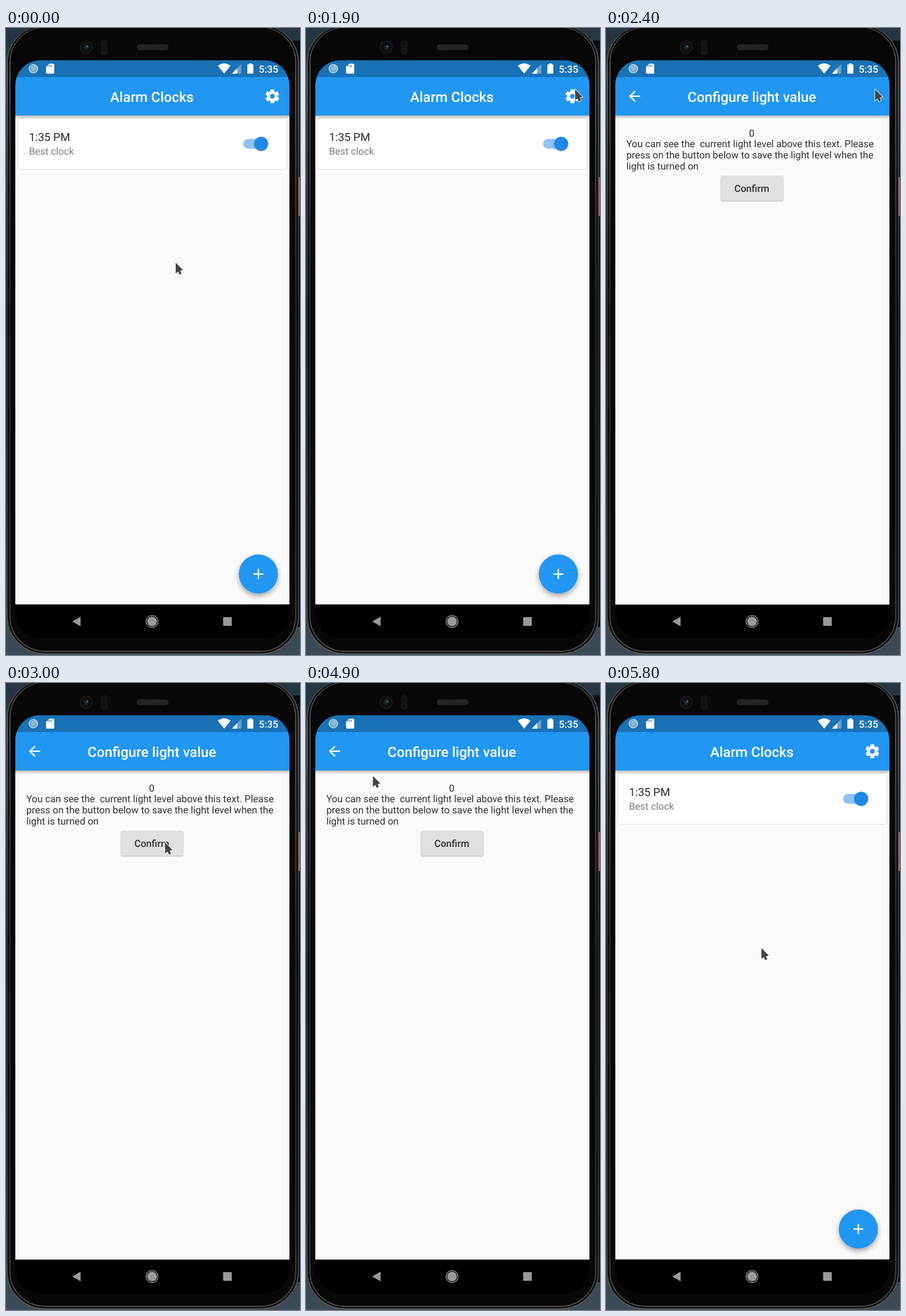
These frames come from a looping animation (473 by 1010 pixels, 6500 ms). An HTML page:

```html
<!DOCTYPE html>
<html lang="en">
<head>
<meta charset="utf-8">
<title>Alarm clock app</title>
<style>
  html, body { margin: 0; width: 100%; height: 100%; overflow: hidden; background: #26323c; }
  svg { display: block; width: 473px; height: 1010px; }
  text { font-family: Roboto, sans-serif; white-space: pre; text-rendering: geometricPrecision; }
  .title { font-size: 22.46px; font-weight: 500; fill: #fff; text-anchor: middle; }
  .body { font-size: 15.7px; fill: #303030; }
  .mid { text-anchor: middle; }
  .medium { font-weight: 500; }
  .card { filter: drop-shadow(0 .6px .8px rgba(0,0,0,.26)); }
  .raised { filter: drop-shadow(0 1.2px 1.2px rgba(0,0,0,.28)); }
  .fab { filter: drop-shadow(0 4px 4.5px rgba(0,0,0,.34)); }
</style>
</head>
<body>
<svg viewBox="0 0 473 1010">
  <defs>
    <linearGradient id="desk" x2="0" y2="1">
      <stop stop-color="#263642"/><stop offset=".5" stop-color="#1a2228"/><stop offset="1" stop-color="#3d4c57"/>
    </linearGradient>
    <linearGradient id="metal" x2="0" y2="1">
      <stop stop-color="#3a3a3a"/><stop offset=".08" stop-color="#6c6c6c"/>
      <stop offset=".3" stop-color="#444"/><stop offset=".45" stop-color="#2c2c2c"/>
      <stop offset=".9" stop-color="#3c3c3c"/><stop offset="1" stop-color="#5c5c5c"/>
    </linearGradient>
    <linearGradient id="shade" x2="0" y2="1">
      <stop stop-opacity=".24"/><stop offset="1" stop-opacity="0"/>
    </linearGradient>
    <radialGradient id="lens">
      <stop stop-color="#26393f"/><stop offset=".35" stop-color="#10191c"/>
      <stop offset=".7" stop-color="#0b0b0b"/><stop offset="1" stop-color="#1e1e1e"/>
    </radialGradient>
    <pattern id="mesh" width="3" height="3" patternUnits="userSpaceOnUse">
      <path d="M0 3L3 0" stroke="#3a3a3a" stroke-width=".8"/>
    </pattern>
    <clipPath id="screen"><rect x="15" y="52" width="441" height="931" rx="40"/></clipPath>
    <clipPath id="view"><rect x="15" y="52" width="441" height="876.500"/></clipPath>
    <g id="sheet">
      <rect x="15" y="141" width="441" height="1000" fill="#fafafa"/>
      <rect x="15" y="141" width="441" height="6" fill="url(#shade)"/>
    </g>
  </defs>

  <!-- Phone -->
  <rect width="473" height="1010" fill="url(#desk)"/>
  <rect x="462" y="20" width="11" height="945" fill="#0b0d0f"/>
  <rect x="2" y="-4" width="468.500" height="1012" rx="60" fill="#121212" stroke="url(#metal)" stroke-width="1.600"/>
  <rect x="6.500" y="-1" width="459.500" height="1005" rx="56" fill="#080808" stroke="url(#metal)" stroke-width="1.400"/>
  <rect x="470.500" y="240" width="5" height="63" rx="1.500" fill="#b2544a"/>
  <circle cx="129" cy="31" r="10.500" fill="url(#lens)"/>
  <circle cx="131" cy="29.500" r="1.200" fill="#5d7379"/>
  <rect x="152.500" y="19" width="11" height="25" rx="5" fill="#111"/>
  <g fill="none" stroke="#1b1b1b"><circle cx="158" cy="26" r="4"/><circle cx="158" cy="37" r="4"/></g>
  <rect x="211" y="27" width="50" height="8" rx="4" fill="#1a1a1a"/>
  <rect x="211" y="27" width="50" height="8" rx="4" fill="url(#mesh)" stroke="#262626"/>

  <g clip-path="url(#screen)">
    <rect x="15" y="52" width="441" height="931"/>
    <g clip-path="url(#view)">
      <!-- Alarm list -->
      <rect x="15" y="52" width="441" height="90" fill="#2196f3"/>
      <circle id="ripple" cx="429" cy="110" r="40" fill="#fff" opacity="0"/>
      <use href="#sheet"/>
      <text class="title" x="234.700" y="118.700">Alarm Clocks</text>
      <g transform="translate(428.500 110) rotate(30)" fill="none" stroke="#fff">
        <circle r="6.200" stroke-width="4.600"/>
        <circle r="9.500" stroke-width="3.400" pathLength="6" stroke-dasharray=".62 .38" stroke-dashoffset=".31"/>
      </g>
      <rect class="card" x="19" y="146" width="432.500" height="81" rx="4" fill="#fff"/>
      <text x="37" y="182" font-size="17.970" fill="#282828">1:35 PM</text>
      <text class="body" x="37" y="204" style="fill:#7b7b7b">Best clock</text>
      <rect x="381.500" y="178.700" width="37" height="15.700" rx="7.850" fill="#8ec3f3"/>
      <circle class="raised" cx="410.500" cy="186.500" r="11.200" fill="#1e88e5"/>
      <circle class="fab" cx="406" cy="879.500" r="31.500" fill="#2196f3"/>
      <path d="M398.100 879.500h15.800M406 871.600v15.800" stroke="#fff" stroke-width="2.250"/>

      <!-- Light settings -->
      <g id="page" opacity="0">
        <rect x="15" y="52" width="441" height="90" fill="#2196f3"/>
        <use href="#sheet"/>
        <path transform="translate(32.500 96.500) scale(1.123)" fill="#fff"
          d="M20 11H7.830l5.590-5.590L12 4l-8 8 8 8 1.410-1.410L7.830 13H20z"/>
        <text class="title" x="234.700" y="118.700">Configure light value</text>
        <text class="body mid" x="234.500" y="174.500">0</text>
        <text class="body" x="32.700" y="192">You can see the  current light level above this text. Please</text>
        <text class="body" x="32.700" y="210">press on the button below to save the light level when the</text>
        <text class="body" x="32.700" y="228">light is turned on</text>
        <rect class="raised" x="185" y="238" width="100" height="40" rx="2.200" fill="#e0e0e0"/>
        <text class="body mid medium" x="234.500" y="264">Confirm</text>
      </g>
    </g>

    <!-- Status bar -->
    <rect x="15" y="52" width="441" height="27" opacity=".25"/>
    <circle cx="44" cy="65.500" r="7" fill="#8db8d9" stroke="#c4dbec" stroke-width="1.200"/>
    <path d="M44 60a5 5 0 1 0 5 6" fill="none" stroke="#6b9fc8" stroke-width="1.500"/>
    <g fill="#fff">
      <path d="M69.500 57.500H76a1.500 1.500 0 0 1 1.500 1.500V72A1.500 1.500 0 0 1 76 73.500H66A1.500 1.500 0 0 1 64.500 72V62.500z"/>
      <path d="M351 73.500L340.800 60.800Q351 53 361.200 60.800z"/>
      <path d="M378.500 58V73.500H363.500z" opacity=".35"/>
      <path d="M372 64.700V73.500H363.500z"/>
      <path d="M391 57h4.500v1.700h2.500V73.500H388.300V58.700H391z"/>
      <text class="medium" x="406.700" y="71.500" font-size="15.900">5:35</text>
    </g>
    <path d="M68 59.500v3m2.700-3v3m2.700-3v3" stroke="#1a72b6" stroke-width="1.200"/>

    <!-- Navigation bar -->
    <g fill="#999">
      <path d="M106.500 956L120 948.300V963.700z"/>
      <circle cx="235" cy="956" r="7.800"/>
      <circle cx="235" cy="956" r="9.700" fill="none" stroke="#999" stroke-width="1.300"/>
      <rect x="349.300" y="949" width="14" height="14" rx="1"/>
    </g>
  </g>

  <path id="cursor" d="M0 0V17.500L3.800 14.500 6.300 19.500 9.300 18 7.600 13 12 12z"
    fill="#444" stroke="#fff" stroke-width="1.400" paint-order="stroke"/>
</svg>
<script>
  const LOOP = 6500, STEP = 100;

  // [time, x, y]
  const cursorKeys = [
    [0, 273, 378], [700, 273, 378], [1000, 286, 352], [1100, 286, 352],
    [1500, 440, 53], [1600, 440, 53], [1900, 433, 99], [2500, 433, 99],
    [3000, 256, 257], [3600, 256, 257], [4200, 56, 113], [4300, 54, 114],
    [4800, 54, 116], [5100, 261, 246], [5400, 282, 390], [5500, 282, 390],
    [5800, 250, 427], [LOOP, 250, 427]
  ];
  // [time, vertical offset, opacity]
  const pageKeys = [
    [0, 219, 0], [2100, 219, 0], [2200, 65, .27], [2300, 9, .66], [2400, 0, 1],
    [4900, 0, 1], [5000, 9, .66], [5100, 68.5, .26], [5200, 185, .03],
    [5300, 219, 0], [LOOP, 219, 0]
  ];

  const $ = id => document.getElementById(id);
  const cursor = $('cursor'), page = $('page'), ripple = $('ripple');

  function sample(keys, t) {
    const i = keys.findIndex(k => k[0] > t);
    const a = keys[i - 1], b = keys[i];
    const p = (t - a[0]) / (b[0] - a[0]);
    const eased = p * p * (3 - 2 * p);
    return [1, 2].map(n => a[n] + (b[n] - a[n]) * eased);
  }

  function draw() {
    const t = Math.floor(performance.now() % LOOP / STEP) * STEP;
    const [x, y] = sample(cursorKeys, t);
    const [offset, opacity] = sample(pageKeys, t);
    cursor.setAttribute('transform', `translate(${x} ${y})`);
    page.setAttribute('transform', `translate(0 ${offset})`);
    page.setAttribute('opacity', opacity);
    ripple.setAttribute('opacity', t >= 2200 && t < 2400 ? .09 : 0);
    requestAnimationFrame(draw);
  }
  draw();
</script>
</body>
</html>
```
